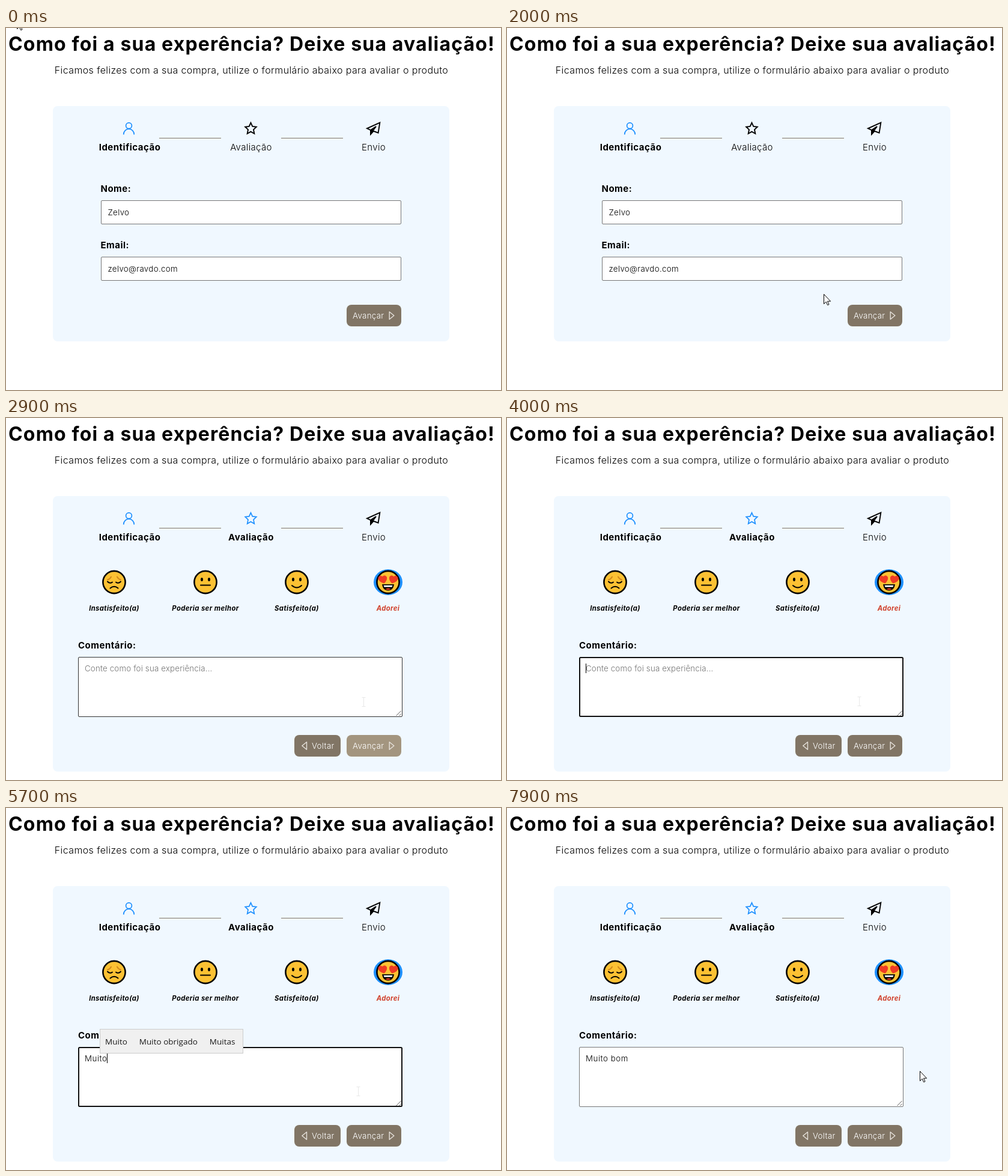
An HTML page that plays this animation: 824x603 px, repeating every 8000 ms.

```html
<!DOCTYPE html>
<html lang="pt-BR">
<head>
<meta charset="utf-8">
<title>Avaliação</title>
<style>
  html, body { margin: 0; width: 100%; height: 100%; overflow: hidden; background: #fff; }
  svg { display: block; }
  text { font: 300 13.33px Montserrat, Inter, sans-serif; letter-spacing: .024em; white-space: pre; }
  .mid { text-anchor: middle; }
  .h1 { font-size: 32px; font-weight: 700; letter-spacing: .036em; }
  .lead { font-size: 16px; }
  .step { font-size: 15px; }
  .bold { font-size: 15px; font-weight: 700; letter-spacing: .033em; }
  .mood { font-size: 11.3px; font-weight: 700; font-style: italic; letter-spacing: .035em; }
  .hint { fill: #757575; letter-spacing: .012em; }
  .typed { letter-spacing: .04em; }
  .field { fill: #fff; stroke: #767676; }
  .field.hover { stroke: #333; }
  .field.focus { stroke: #101010; stroke-width: 2; }
  .btn { fill: #817565; }
  .btn.warm { fill: #928570; }
  .btn.hover { fill: #a3957f; }
  .btnText { fill: #fff; }
  .tri { fill: none; stroke: #e6e2dc; stroke-width: 1.4; stroke-linejoin: round; }
  .icon { fill: none; stroke: #000; stroke-width: 1.9; }
  .icon.done { stroke: #1e90ff; stroke-width: 1.7; }
  .face { fill: #fcc133; stroke: #000; stroke-width: 2.6; }
  .ink { fill: none; stroke: #000; stroke-width: 2; stroke-linecap: round; }
  .brow { fill: none; stroke: #d28a1d; stroke-width: 2; stroke-linecap: round; }
  .pop text { font: 13.5px "Open Sans", "Noto Sans", sans-serif; letter-spacing: 0; fill: #1a1a1a; }
  .ptr { fill: #fff; stroke: #000; stroke-linejoin: round; }
  .beam { fill: none; stroke: #e8e8e8; }
</style>
</head>
<body>
<svg width="824" height="603" viewBox="0 0 824 603">
  <defs>
    <circle id="face" class="face" r="18.6"/>
    <path id="arrow" class="ptr" d="M.5.5V16.6L4.2 13.1 6.7 18.6 9 17.6 6.5 12.2H11.6Z"/>
    <path id="hand" class="ptr" d="M5.5 11V2q0-1.5 1.4-1.5T8.3 2V7q4.5 0 7.2 1.8V14q-.7 2-2 4.5H7Q4 14 1 11q1-2 4.5 0Z"/>
    <path id="beam" class="beam" d="M-3 -7.5H3M0 -7.5V7.5M-3 7.5H3"/>
  </defs>

  <text class="h1 mid" x="409" y="38">Como foi a sua experência? Deixe sua avaliação!</text>
  <text class="lead mid" x="408.5" y="76">Ficamos felizes com a sua compra, utilize o formulário abaixo para avaliar o produto</text>
  <rect id="panel" x="78" y="130" width="660" height="392" rx="8" fill="#f0f8ff"/>

  <g class="icon done"><circle cx="204.5" cy="162.7" r="4.9"/><path d="M195.7 177.5C195.700 172 199.6 168.2 204.5 168.2S213.3 172 213.3 177.5"/></g>
  <path id="star" class="icon" d="M407.5 157.8L410.3 163.9 416.8 164.7 412 169.3 413.3 176 407.500 172.700 401.700 176 403 169.300 398.200 164.700 404.700 163.900Z"/>
  <g class="icon"><path d="M622.300 157.700L601 167.300 607 170 619.600 174.600ZM607 170V177L611.500 172"/><path d="M607 170L616 164 610.500 171.500 607 176Z" fill="#000"/></g>
  <path d="M255 183.500H358M458 183.500H561" stroke="#817565"/>
  <text class="bold mid" x="206" y="204">Identificação</text>
  <text id="rateLabel" class="step mid" x="408" y="204">Avaliação</text>
  <text class="step mid" x="612" y="204">Envio</text>

  <g id="page1">
    <text class="bold" x="157.500" y="273">Nome:</text>
    <rect class="field" x="158.500" y="287.500" width="499" height="39" rx="1.500"/>
    <text x="169.500" y="312">Zelvo</text>
    <text class="bold" x="157.500" y="367">Email:</text>
    <rect id="email" class="field" x="158.500" y="381.500" width="499" height="39" rx="1.500"/>
    <text x="169.500" y="406">zelvo@ravdo.com</text>
  </g>

  <g id="page2">
    <ellipse cx="636" cy="273.500" rx="24" ry="21.500" fill="#1e90ff"/>
    <g transform="translate(180 273.500)">
      <use href="#face"/>
      <path class="brow" d="M-11-4Q-7-5-5-9M11-4Q7-5 5-9"/>
      <path class="ink" d="M-11-1Q-7 3-3 0M11-1Q7 3 3 0M-6.500 10Q0 4.500 6.500 10"/>
    </g>
    <g transform="translate(332 273.500)">
      <use href="#face"/>
      <ellipse cx="-6" cy="-4.500" rx="2" ry="3"/><ellipse cx="6" cy="-4.500" rx="2" ry="3"/>
      <path class="ink" d="M-8 5H8"/>
    </g>
    <g transform="translate(484 273.500)">
      <use href="#face"/>
      <ellipse cx="-6" cy="-4.500" rx="2" ry="3"/><ellipse cx="6" cy="-4.500" rx="2" ry="3"/>
      <path class="ink" d="M-8 5.500Q0 12.500 8 5.500"/>
    </g>
    <g transform="translate(636 273.500)">
      <use href="#face"/>
      <g fill="#ee3b24">
        <path id="heart" d="M-6.500 2Q-17-1-16.500-7.500-14-13-9.500-9.500-5-13.500-2-8.500-1-3-6.500 2Z"/>
        <use href="#heart" transform="scale(-1 1)"/>
      </g>
      <path d="M-10 3.500H10Q8.500 14 0 14T-10 3.500Z"/>
      <path d="M-7.500 5.200H7.500L6.500 8H-6.500Z" fill="#fff"/>
      <path d="M-4.500 11.500Q0 8.500 4.500 11.500 0 14-4.500 11.500Z" fill="#ee3b24"/>
    </g>
    <text class="mood mid" x="180" y="321">Insatisfeito(a)</text>
    <text class="mood mid" x="332" y="321">Poderia ser melhor</text>
    <text class="mood mid" x="484" y="321">Satisfeito(a)</text>
    <text class="mood mid" x="636" y="321" fill="#d0402b">Adorei</text>

    <text class="bold" x="120" y="384">Comentário:</text>
    <rect id="area" class="field" rx="1.500"/>
    <path d="M649.500 496L657.500 488M654.500 496L657.500 493" stroke="#555"/>
    <text id="hint" class="hint" x="131" y="422">Conte como foi sua experiência...</text>
    <text id="typed" class="typed" x="131" y="422"></text>
    <rect id="caret" y="409" width="1" height="16"/>
    <g id="pop" class="pop">
      <rect id="popBox" x=".5" y="368.500" height="40" fill="#f0f0f0" stroke="#ccc"/>
      <text id="popText" x="9" y="394"></text>
    </g>

    <rect class="btn" x="480" y="528" width="77" height="36" rx="8"/>
    <path class="tri" d="M500.500 539.800L492.800 546 500.500 552.200Z"/>
    <text class="btnText" x="509" y="551">Voltar</text>
  </g>

  <g id="next">
    <rect id="nextBtn" class="btn" x="567" y="461" width="91" height="36" rx="8"/>
    <path class="tri" d="M638.200 472.800L645.900 479 638.200 485.200Z"/>
    <text class="btnText" x="577" y="484">Avançar</text>
  </g>
  <use id="cursor"/>
</svg>
<script>
const LOOP = 8000;
const $ = id => document.getElementById(id);

// Each track lists [start ms, ...values]; a value holds until the next entry.
const cursor = [
  [0, 'arrow', 18, -15], [300, 'arrow', 14, -17], [400],
  [1100, 'arrow', 492, 534], [1200, 'arrow', 503, 462], [1300, 'beam', 512, 405],
  [2000, 'arrow', 527, 443], [2100, 'arrow', 562, 457], [2200, 'hand', 589, 470],
  [2900, 'beam', 595.5, 473], [3000, 'beam', 606.5, 495],
  [3400, 'arrow', 723, 492], [4000, 'beam', 586.5, 472],
  [7500, 'arrow', 672, 458], [7800, 'arrow', 684, 444], [7900, 'arrow', 687, 438]
];
const emailState = [[0, ''], [1300, 'hover'], [2000, '']];
const areaState = [[0, ''], [2900, 'hover'], [3000, ''], [4000, 'focus'], [7800, '']];
const nextState = [[0, ''], [2400, 'warm'], [2500, 'hover'], [3000, '']];
const caretOn = [[0, 0], [4000, 1], [4600, 0], [5000, 1], [7100, 0], [7600, 1], [7800, 0]];
const typedCount = [
  [0, 0], [5000, 1], [5400, 2], [5500, 3], [5600, 4], [5700, 5],
  [6000, 6], [6300, 7], [6400, 8], [6500, 9]
];
const popup = [
  [0], [5200, 143, 170, 'Mais', 'Muito', 'Mas'],
  [5600, 156, 239, 'Muito', 'Muito obrigado', 'Muitas'],
  [5800, 169, 176, 'Muito', 'Muitos', 'Muita'], [6000],
  [6400, 172, 230, 'bom', 'boa semana', 'bom dia'], [6600],
  [6800, 203, 171, 'dia', 'demais', 'para'], [7800]
];

const at = (track, t) => track.findLast(e => e[0] <= t).slice(1);
const show = (id, on) => $(id).setAttribute('visibility', on ? 'inherit' : 'hidden');
const set = (id, attrs) => {
  for (const k in attrs) $(id).setAttribute(k, attrs[k]);
};

function draw(t) {
  const second = t >= 2900;
  show('page1', !second);
  show('page2', second);
  set('panel', { height: second ? 459 : 392 });
  set('star', { class: second ? 'icon done' : 'icon' });
  set('rateLabel', { class: second ? 'bold mid' : 'step mid' });
  set('next', { transform: `translate(0 ${second ? 67 : 0})` });
  set('nextBtn', { class: 'btn ' + at(nextState, t) });
  set('email', { class: 'field ' + at(emailState, t) });

  const [state] = at(areaState, t);
  const inset = state === 'focus' ? 1 : .5;
  set('area', {
    class: 'field ' + state, x: 120 + inset, y: 398 + inset,
    width: 540 - 2 * inset, height: 100 - 2 * inset
  });

  const count = at(typedCount, t)[0];
  $('typed').textContent = 'Muito bom'.slice(0, count);
  show('hint', second && !count);
  show('caret', second && at(caretOn, t)[0]);
  const textWidth = count ? $('typed').getComputedTextLength() : 0;
  set('caret', { x: Math.round(131 + textWidth) });

  const [left, width, ...words] = at(popup, t);
  show('pop', second && left);
  if (left) {
    set('pop', { transform: `translate(${left} 0)` });
    set('popBox', { width: width - 1 });
    $('popText').innerHTML = words
      .map((w, i) => `<tspan dx="${i ? 20 : 0}">${w}</tspan>`).join('');
  }

  const [shape, x, y] = at(cursor, t);
  show('cursor', shape);
  if (shape) set('cursor', { href: '#' + shape, transform: `translate(${x} ${y})` });
}

const start = performance.now();
function tick() {
  draw((performance.now() - start) % LOOP);
  requestAnimationFrame(tick);
}
tick();
</script>
</body>
</html>
```
